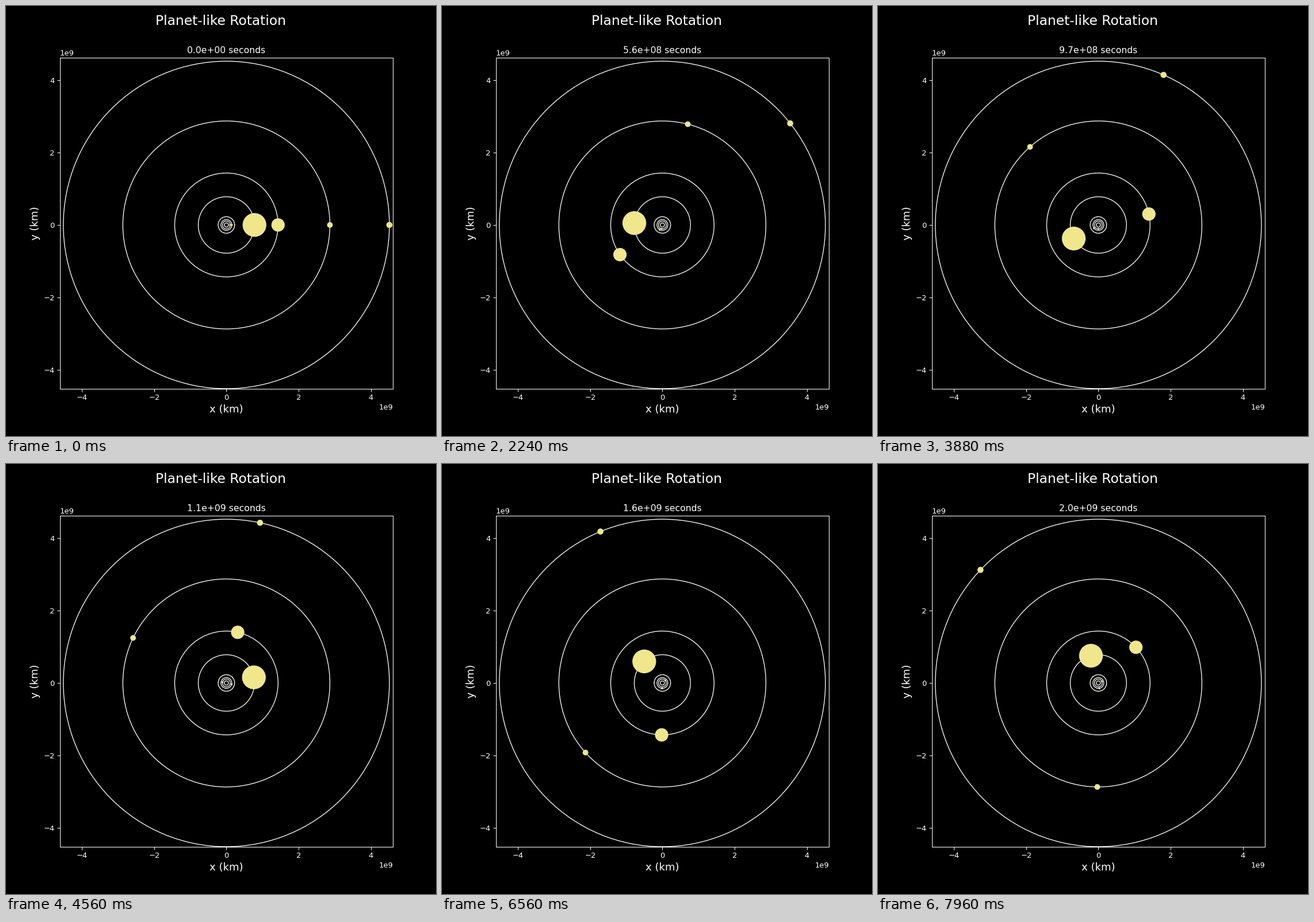
Animation, 748 px wide and 748 px high, one loop 8 s. Source, as a matplotlib script:

```python
import matplotlib.pyplot as plt
import numpy as np
from matplotlib.animation import FuncAnimation
from matplotlib.patches import Circle

FRAMES = 200
INTERVAL = 40    # ms
STEP = 1e7       # simulated seconds per frame
GM = 1.3155e11   # km^3 / s^2

# Mercury to Neptune: orbit radius (km) and mass (1e24 kg)
radius = np.array([57.9, 108.2, 149.6, 228.0, 778.1, 1431.6, 2867.0, 4515.0]) * 1e6
mass = np.array([0.33, 4.87, 5.97, 0.642, 1898, 568, 86.8, 102])
omega = np.sqrt(GM / radius**3)


def positions(t):
    angle = omega * t
    return np.column_stack([radius * np.cos(angle), radius * np.sin(angle)])


plt.style.use("dark_background")
plt.rcParams["font.family"] = "DejaVu Sans"

fig, ax = plt.subplots(figsize=(8, 8), dpi=93.5)
fig.suptitle("Planet-like Rotation", fontsize=18)
ax.set_xlabel("x (km)", fontsize=14)
ax.set_ylabel("y (km)", fontsize=14)

for r in radius:
    ax.add_patch(Circle((0, 0), r, fill=False, edgecolor="white", linewidth=1))

start = positions(0)
planets = ax.scatter(start[:, 0], start[:, 1], s=mass / 2, color="khaki",
                     linewidths=1, zorder=2)
title = ax.set_title("")

edge = radius[-1]
ax.set_xlim(-edge - 1e8, edge + 1e8)
ax.set_ylim(-edge, edge + 1e8)


def update(i):
    t = i * STEP
    planets.set_offsets(positions(t))
    title.set_text(f"{t:.1e} seconds")
    return planets, title


anim = FuncAnimation(fig, update, frames=FRAMES, interval=INTERVAL,
                     repeat=True, repeat_delay=0)
plt.show()
```
